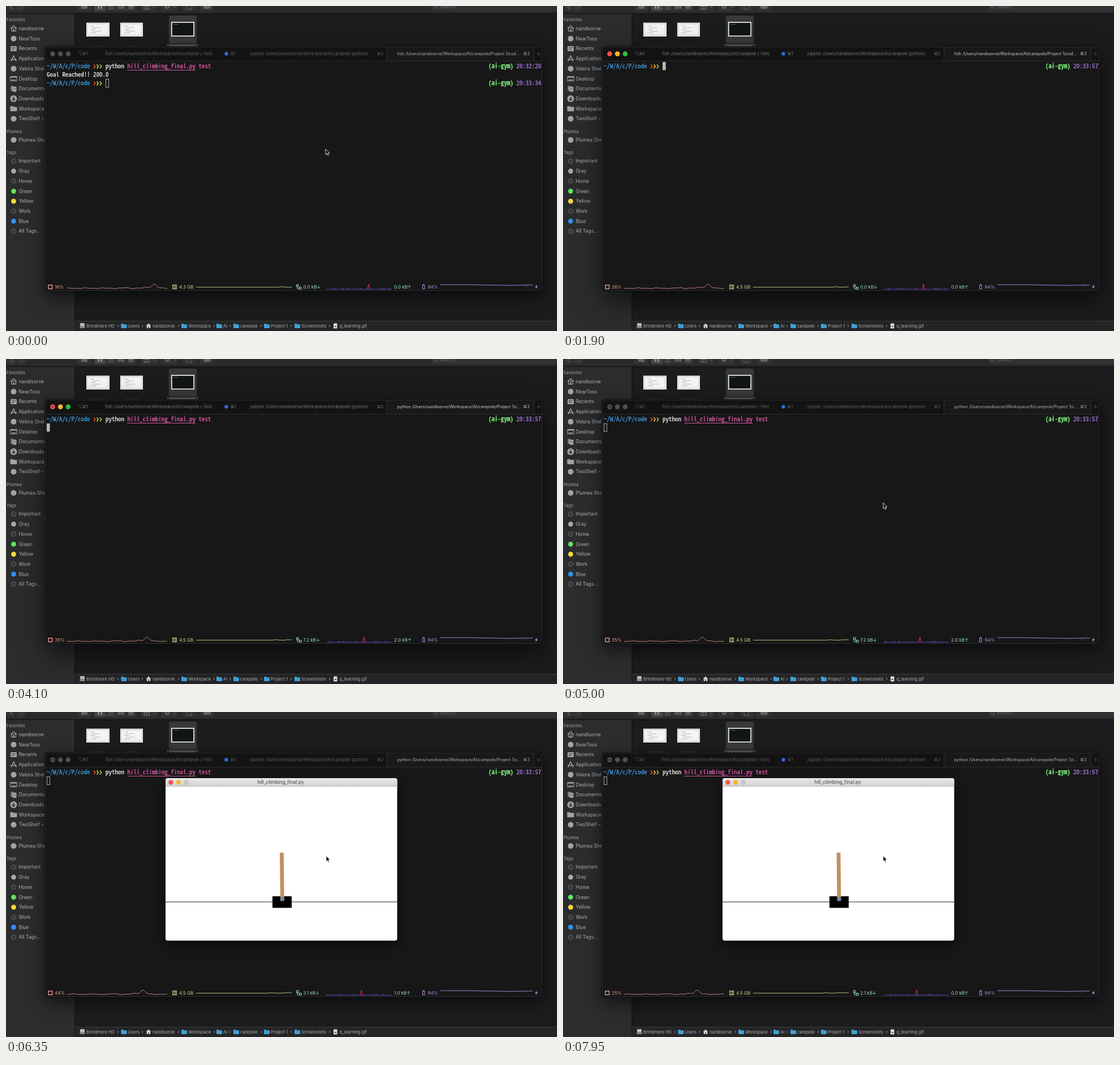
These frames come from a looping animation (974x575 px, 8000 ms). An HTML page with a canvas:

```html
<!DOCTYPE html>
<html lang="en">
<head>
<meta charset="utf-8">
<title>Cart pole demo</title>
<style>
html, body { margin: 0; width: 100%; height: 100%; overflow: hidden; background: #1b1c1e; }
canvas { display: block; }
</style>
</head>
<body>
<canvas id="stage" width="974" height="575"></canvas>
<script>
const g = document.getElementById('stage').getContext('2d');
const LOOP = 8000;
const UI = 'Inter, "DejaVu Sans", sans-serif';
const MONO = '"Noto Sans Mono CJK SC", "Noto Sans Mono CJK JP", "Noto Sans Mono", monospace';
const USER = 'nandisorve';
const HOME = `/Users/${USER}/Workspace/AI/carepole`;
const SCRIPT = 'hill_climbing_final.py';

// Moments, in ms
const FOCUS = 450, TYPE = 950, CLEAR = 1650, RECALL = 3000, RUN = 3650, BLUR = 4700, SHOW = 5300;

// Terminal grid
const CELL = 5.48, LEFT = 72, ROW = 15;
g.font = `100px ${MONO}`;
const monoSize = CELL * 100 / g.measureText('m').width;

function rect(x, y, w, h, color) {
  g.fillStyle = color;
  g.fillRect(x, y, w, h);
}

function round(x, y, w, h, r, color) {
  g.fillStyle = color;
  g.beginPath();
  g.roundRect(x, y, w, h, r);
  g.fill();
}

function dot(x, y, r, color) {
  g.fillStyle = color;
  g.beginPath();
  g.arc(x, y, r, 0, Math.PI * 2);
  g.fill();
}

function ring(x, y, r, color) {
  g.strokeStyle = color;
  g.lineWidth = 1;
  g.beginPath();
  g.arc(x, y, r, 0, Math.PI * 2);
  g.stroke();
}

function line(points, color, width = 1) {
  g.strokeStyle = color;
  g.lineWidth = width;
  g.beginPath();
  points.forEach(([x, y]) => g.lineTo(x, y));
  g.stroke();
}

function shape(points, color) {
  g.fillStyle = color;
  g.beginPath();
  points.forEach(([x, y]) => g.lineTo(x, y));
  g.closePath();
  g.fill();
}

function text(s, x, y, size, color, weight = 400) {
  g.font = `${weight} ${size}px ${UI}`;
  g.textBaseline = 'middle';
  g.fillStyle = color;
  g.fillText(s, x, y + 0.4);
}

// A hairline stroke gives the terminal face its weight
function mono(s, x, row, color, weight = 400) {
  const y = 110.3 + row * ROW;
  g.font = `${weight} ${monoSize}px ${MONO}`;
  g.textBaseline = 'alphabetic';
  g.fillStyle = g.strokeStyle = color;
  g.lineWidth = 0.25;
  g.fillText(s, x, y);
  g.strokeText(s, x, y);
}

function folder(x, y, color, w = 10, h = 8) {
  round(x, y - h / 2, w * 0.45, h / 2, 1, color);
  round(x, y - h / 2 + 1.2, w, h - 1.2, 1, color);
}

function house(x, y, r, color) {
  line([[x - r, y], [x, y - r], [x + r, y]], color, 1.1);
  g.strokeRect(x - r * 0.7, y - r * 0.2, r * 1.4, r);
  rect(x - 1, y + 1, 2, r - 1, color);
}

// Sidebar glyphs, drawn around (x, y)
const GRAY = '#a2a3a4';
const icons = {
  home: (x, y) => house(x, y, 5.5, GRAY),
  disc: (x, y) => dot(x, y, 5, GRAY),
  recent(x, y) {
    round(x - 5.5, y - 4.5, 11, 9, 1.5, GRAY);
    rect(x - 3.5, y - 2, 7, 1, '#333');
    rect(x - 3.5, y + 1, 5, 1, '#333');
  },
  apps(x, y) {
    line([[x - 4.5, y + 4.5], [x, y - 5], [x + 4.5, y + 4.5]], GRAY, 1.4);
    line([[x - 5.5, y + 1.5], [x + 5.5, y + 1.5]], GRAY, 1.4);
  },
  desk(x, y) {
    g.strokeStyle = GRAY;
    g.lineWidth = 1;
    g.strokeRect(x - 5.5, y - 4, 11, 8);
    rect(x - 5.5, y - 4, 11, 2, GRAY);
    rect(x - 3.5, y + 1.5, 7, 1.5, GRAY);
  },
  docs(x, y) {
    round(x - 5, y - 5, 5, 9, 1, '#858687');
    round(x - 1.5, y - 3.5, 6.5, 9, 1, GRAY);
    rect(x, y, 3.5, 1, '#444');
  },
  down(x, y) {
    dot(x, y, 6, GRAY);
    line([[x, y - 3.5], [x, y + 2.5]], '#2c2d2e', 1.5);
    line([[x - 2.5, y], [x, y + 3], [x + 2.5, y]], '#2c2d2e', 1.5);
  },
  folder: (x, y) => folder(x - 6, y, GRAY, 12, 9),
};

const favorites = [
  ['home', USER], ['disc', 'NearToss'], ['recent', 'Recents'], ['apps', 'Applications'],
  ['disc', 'Velora Shelf'], ['desk', 'Desktop'], ['docs', 'Documents'], ['down', 'Downloads'],
  ['folder', 'Workspace'], ['disc', 'TwoShelf –'],
];
const tags = [
  ['Important'], ['Gray', '#a9a9a9'], ['Home'], ['Green', '#62e35f'], ['Yellow', '#fbd938'],
  ['Work'], ['Blue', '#3390f5'], ['All Tags...'],
];

function sidebar() {
  const head = '#919293', label = '#b0b1b2', step = 17.72;
  rect(0, 14, 122, 561, '#2a2c2e');
  text('Favorites', 1, 24.8, 7.5, head, 500);
  favorites.forEach(([icon, name], i) => {
    const y = 40 + i * step;
    icons[icon](13.5, y);
    text(name, 22.5, y, 8.5, label);
  });
  text('Plumea', 1, 222, 7.5, head, 500);
  icons.disc(13.5, 237);
  text('Plumea Shelf', 22.5, 237, 8.5, label);
  text('Tags', 1, 259.2, 7.5, head, 500);
  tags.forEach(([name, color], i) => {
    const y = 274.4 + i * step;
    if (color) dot(13.5, y, 4.4, color);
    else {
      dot(13.5, y, 4.2, '#38393b');
      ring(13.5, y, 4.2, '#68696b');
    }
    text(name, 22.5, y, 8.5, label);
  });
  rect(121.5, 14, 1, 561, '#0c0c0d');
}

function toolbar() {
  const ink = '#646567';
  rect(0, 0, 974, 14, '#292a2c');
  const buttons = [[2, 15], [18, 16], [126, 25], [156, 75], [238, 30], [274, 29], [313, 23], [342, 26]];
  for (const [x, w] of buttons) round(x, -8, w, 17, 3, '#323335');
  round(156, -8, 20, 17, 3, '#444547');
  round(752, -8, 225, 17, 3, '#313234');
  line([[12, -1], [8, 2], [12, 6]], ink, 1.2);
  line([[25, -1], [29, 2], [25, 6]], '#4a4b4d', 1.2);
  rect(133, 0, 11, 5, ink);
  rect(162, 0, 3, 5, '#858688');
  rect(167, 0, 3, 5, '#858688');
  for (const y of [0, 2.5, 5]) rect(180, y, 10, 1, ink);
  for (const x of [198, 202, 206]) rect(x, 0, 3, 5, ink);
  rect(216, 0, 10, 3, ink);
  rect(216, 4, 10, 1.5, ink);
  for (const x of [243, 247, 251]) for (const y of [0, 4]) rect(x, y, 3, 2.5, ink);
  for (const x of [262, 299]) line([[x - 2, 1], [x, 3], [x + 2, 1]], ink);
  dot(285, 1, 4, ink);
  dot(285, 1, 1.4, '#353638');
  line([[320, 0], [320, 6], [328, 6], [328, 0]], ink);
  round(349, -3, 13, 8, 3, ink);
  ring(759, 1, 2.6, ink);
  line([[761, 3], [764, 6]], ink);
  text('Search', 767, 1.5, 8.2, '#67686b');
  rect(0, 13, 974, 1, '#0d0d0e');
}

function thumbs() {
  for (const [x, w] of [[142, 41], [202, 40]]) {
    rect(x, 29.5, w, 24.5, '#f4f4f4');
    g.strokeStyle = '#c9c5c5';
    g.lineWidth = 1;
    g.strokeRect(x + 2, 31.5, w - 4, 20.5);
    for (let i = 0; i < 5; i++) rect(x + 7 + i % 2 * 3, 35 + i * 3, 7 + i * 7 % 12, 0.8, '#aaa');
    rect(x + 5, 70.5, w - 10, 1, '#4c4d4f');
  }
  round(288, 17, 49, 49, 3, '#39393a');
  rect(292, 28, 41, 26, '#eee');
  rect(293.7, 29.7, 37.6, 22.6, '#111514');
  rect(296, 32, 9, 1, '#466');
  round(284, 67, 56, 10, 2, '#414243');
  rect(290, 70, 44, 1, '#777');
}

function pathBar() {
  const blue = '#419fd5', ink = '#b0b1b2', y = 566;
  rect(122, 557, 852, 18, '#242527');
  rect(122, 557, 852, 1, '#3a3b3d');
  round(131, 561, 8, 6, 1, '#bbb');
  round(130.5, 566, 9, 4, 1, '#888');
  const crumbs = [
    ['Brindmore HD', 142, 197], ['Users', 215.5, 240], [USER, 259, 304], ['Workspace', 322, 367],
    ['AI', 384, 395], ['carepole', 414, 450], ['Project 1', 468, 503], ['Screenshots', 522, 571],
    ['q_learning.gif', 589.5],
  ];
  crumbs.forEach(([name, x, sep], i) => {
    if (i === 2) {
      shape([[x - 11.5, y], [x - 7, y - 4.5], [x - 2.5, y]], '#d8cfc4');
      rect(x - 10.3, y, 6.6, 4, '#d8cfc4');
      rect(x - 8, y + 1, 2, 3, '#6d5a48');
    } else if (i > 0 && i < 8) folder(x - 12, y, blue);
    text(name, x, y, 7.5, ink);
    if (sep) line([[sep, y - 2], [sep + 2, y], [sep, y + 2]], '#aaa', 0.9);
  });
  round(579, 561.5, 6.5, 9, 1, '#ddd');
  rect(580.5, 566, 3.5, 2, '#666');
}

function tabBar(focused, running) {
  const dim = focused ? '#777' : '#626262';
  round(69, 72, 880, 25, [5, 5, 0, 0], '#131313');
  rect(673.5, 73, 260, 24, '#191919');
  rect(70, 97, 878, 1, '#2a2a2a');
  rect(673, 73, 1, 24, '#2e2e2e');
  rect(933, 73, 1, 24, '#2e2e2e');
  const lights = focused ? ['#f5524a', '#f6b72c', '#2bc03f'] : ['#505050', '#505050', '#505050'];
  lights.forEach((c, i) => dot(82.5 + i * 13.7, 84.6, 4.3, c));
  if (running) dot(82.5, 84.6, 1.4, focused ? '#7a1712' : '#1a1a1a');
  text('⌥⌘1', 127, 84, 7.2, dim);
  text(`fish ${HOME} (-fish)`, 175.5, 84.5, 7.47, dim);
  dot(389.5, 84.5, 3.2, '#2f6be0');
  text('⌘1', 396.5, 84.5, 7.2, dim);
  text(`jupyter ${HOME} (python)`, 432, 84.5, 7.45, dim);
  text('⌘2', 655.5, 84.5, 7.2, dim);
  const title = running ? `python ${HOME}/Project 1/c...` : `fish ${HOME}/Project 1/cod...`;
  text(title, 691.5, 84.5, 7.32, focused ? '#d0d0d0' : '#b4b4b4');
  text('⌘3', 914, 84.5, 7.2, focused ? '#c0c0c0' : '#a4a4a4');
  line([[938, 84.5], [945, 84.5]], '#444');
  line([[941.5, 81], [941.5, 88]], '#444');
}

function prompt(row, clock) {
  mono('~/W/A/c/P/code', LEFT, row, '#3f9de8');
  const y = 107 + row * ROW;
  ['#e5482d', '#ecb63c', '#86d043'].forEach((color, i) => {
    const x = LEFT + (15 + i) * CELL + 0.8;
    line([[x, y - 3.6], [x + 2.8, y], [x, y + 3.6]], color, 1.7);
  });
  const right = 946 - 17 * CELL;
  mono('(ai-gym)', right, row, '#73e272', 700);
  mono(clock, right + 9 * CELL, row, '#ab7ff0');
}

function command(row) {
  const x = LEFT + 19 * CELL, pink = '#ea5bb0';
  mono('python', x, row, '#f0f0f0');
  mono(SCRIPT, x + 7 * CELL, row, pink);
  mono('test', x + 30 * CELL, row, pink);
  rect(x + 7 * CELL, 113 + row * ROW, 22 * CELL, 0.9, pink);
}

function cursor(col, row, focused) {
  const x = LEFT + col * CELL, y = 99 + row * ROW;
  if (focused) return rect(x, y, 5.5, 14.5, '#bcbcbc');
  g.strokeStyle = '#a8a8a8';
  g.lineWidth = 1;
  g.strokeRect(Math.floor(x) + 0.5, y + 0.5, 5, 14);
}

function session(t, focused) {
  if (t < CLEAR) {
    const typed = 'clear'.slice(0, Math.max(0, Math.floor((t - TYPE) / 110) + 1));
    prompt(0, '20:32:20');
    command(0);
    mono('Goal Reached!! 200.0', LEFT, 1, '#f0f0f0');
    prompt(2, '20:33:34');
    mono(typed, LEFT + 19 * CELL, 2, '#f0f0f0');
    cursor(19 + typed.length, 2, focused);
    return;
  }
  prompt(0, '20:33:57');
  if (t >= RECALL) command(0);
  if (t >= RUN) cursor(0, 1, focused);
  else cursor(t >= RECALL ? 53 : 19, 0, focused);
}

const bump = (x, mid, w) => Math.exp(-(((x - mid) / w) ** 2));

function plot(x0, x1, f, color) {
  const points = [];
  for (let x = x0; x <= x1; x++) points.push([x, f(x)]);
  line(points, color, 1);
}

function statusBar(t) {
  const y = 497, s = t / 1000;
  const i = Math.floor((t + 950) / 2000);
  const pink = '#eb9a94', lime = '#c3d98b', mint = '#98e3c7', violet = '#b58de8';

  g.lineWidth = 1.4;
  g.strokeStyle = pink;
  g.strokeRect(75, 493.7, 6.6, 6.6);
  text([16, 26, 35, 44, 25][i] + '%', 86, y, 8, pink);
  plot(108, 285, x => {
    const u = x + 3.15 * s;
    const ripple = 0.4 * Math.sin(u * 0.19) + 0.3 * Math.sin(u * 0.41 + 1) + 0.8 * bump(u, 212, 5);
    return 499.3 - ripple - 7 * bump(u, 262, 6) - 1.5 * bump(u, 249, 6);
  }, '#b97c77');

  g.strokeStyle = lime;
  g.lineWidth = 1;
  g.strokeRect(294.5, 493.5, 7, 7);
  line([[297, 493], [297, 501]], lime);
  line([[299.5, 493], [299.5, 501]], lime);
  text((i ? '4.5' : '4.3') + ' GB', 306, y, 8, lime);
  plot(336, 505, x => 497.4 - 0.7 * bump(x + 3.1 * s, 489, 4) - (x + 3.1 * s > 507 ? 0.6 : 0), '#acbd76');

  g.strokeStyle = mint;
  g.strokeRect(513.5, 493, 3.5, 3.5);
  g.strokeRect(518.5, 497.5, 3.5, 3.5);
  line([[515, 497], [515, 500], [518, 500]], mint);
  text(['0.0', '0.0', '7.2', '3.1', '2.1'][i] + ' kB↓', 525.5, y, 8, mint);
  plot(567, 682, () => 501, '#5d42c4');
  const shift = 2 * s;
  for (const [x, h] of [[580, 1.5], [596, 1], [604, 2], [627, 1.5], [662, 2], [668, 1.5], [679, 1]]) {
    if (x - shift > 567) line([[x - shift - 2, 501], [x - shift, 501 - h], [x - shift + 2, 501]], '#7a47a8');
  }
  line([[638.8 - shift, 501], [641 - shift, 492.5], [643.2 - shift, 501]], '#c2344e', 1.1);
  text(['0.0', '0.0', '2.0', '1.0', '0.0'][i] + ' kB↑', 686, y, 8, mint);

  g.strokeStyle = violet;
  g.lineWidth = 1;
  g.strokeRect(736.5, 494, 3.5, 6.5);
  rect(737.2, 492, 2, 1.5, violet);
  text('94%', 745.5, y, 8, violet);
  line([[768, 493], [815, 493], [890, 494.3], [931, 493.6]], '#a881d8');
  line([[920 - 0.4 * s, 494], [920 - 0.4 * s, 497.5]], '#5c4a75');
  shape([[938.5, 492.5], [935, 497.5], [937, 497.5], [936.3, 501], [940, 496], [937.8, 496]], violet);
}

function shadowed(x, y, w, h, r, color, blur, drop) {
  g.save();
  g.shadowColor = 'rgba(0,0,0,0.6)';
  g.shadowBlur = blur;
  g.shadowOffsetY = drop;
  round(x, y, w, h, r, color);
  g.restore();
}

function frame(x, y, w, h, color) {
  g.strokeStyle = color;
  g.lineWidth = 1;
  g.beginPath();
  g.roundRect(x, y, w, h, 5);
  g.stroke();
}

function terminal(t) {
  const focused = t >= FOCUS && t < BLUR;
  shadowed(69, 72, 880, 433, 5, '#171717', focused ? 46 : 30, focused ? 16 : 10);
  tabBar(focused, t >= RUN);
  session(t, focused);
  statusBar(t);
  frame(68.5, 71.5, 880, 433, '#0b0b0b');
  frame(69.5, 72.5, 878, 431, '#2e2e2f');
}

function cartPole(t) {
  shadowed(282, 117, 409.5, 287.5, 4, '#fff', 24, 8);
  const bar = g.createLinearGradient(0, 117, 0, 132);
  bar.addColorStop(0, '#e9e9e9');
  bar.addColorStop(1, '#d0d0d0');
  round(282, 117, 409.5, 15, [4, 4, 0, 0], bar);
  rect(282, 131, 409.5, 1, '#b8b8b8');
  dot(291.5, 124.5, 4.2, '#f2544d');
  dot(305, 124.5, 4.2, '#f5b52e');
  dot(318.6, 124.5, 4.2, '#c9c9c9');
  ring(318.6, 124.5, 3.9, '#b9b9b9');
  text(SCRIPT, 444.5, 124.5, 8.5, '#404040');

  const s = (t - 5500) / 1000;
  const x = 488 + 1.2 * Math.exp(-1.4 * Math.max(s, -0.2));
  const tilt = -0.006 + 0.006 * Math.cos((s - 1.7) * Math.PI / 0.75);
  rect(282, 335.5, 409.5, 1, '#222');
  rect(Math.round(x - 17), 326, 34, 20.5, '#000');
  g.save();
  g.translate(x, 330.9);
  g.rotate(tilt);
  rect(-3.4, -82, 6.8, 85.3, '#c0915f');
  g.restore();
  dot(x, 330.9, 3.4, '#668ab8');
}

function pointer(x, y) {
  const outline = [[0, 0], [0, 9.8], [2.2, 7.8], [3.7, 11.2], [5.3, 10.5], [3.9, 7.2], [6.8, 7]];
  const points = outline.map(([a, b]) => [x + a, y + b]);
  shape(points, '#050505');
  g.lineJoin = 'round';
  line([...points, points[0]], '#eee', 0.9);
  g.lineJoin = 'miter';
}

function draw(t) {
  rect(0, 0, 974, 575, '#1b1c1e');
  thumbs();
  sidebar();
  toolbar();
  pathBar();
  terminal(t);
  if (t >= SHOW) cartPole(t);
  if (t < TYPE) pointer(565, 253);
  else if (t >= BLUR) pointer(566, 254.6);
}

const start = performance.now();
function tick() {
  draw((performance.now() - start) % LOOP);
  requestAnimationFrame(tick);
}
tick();
</script>
</body>
</html>
```
